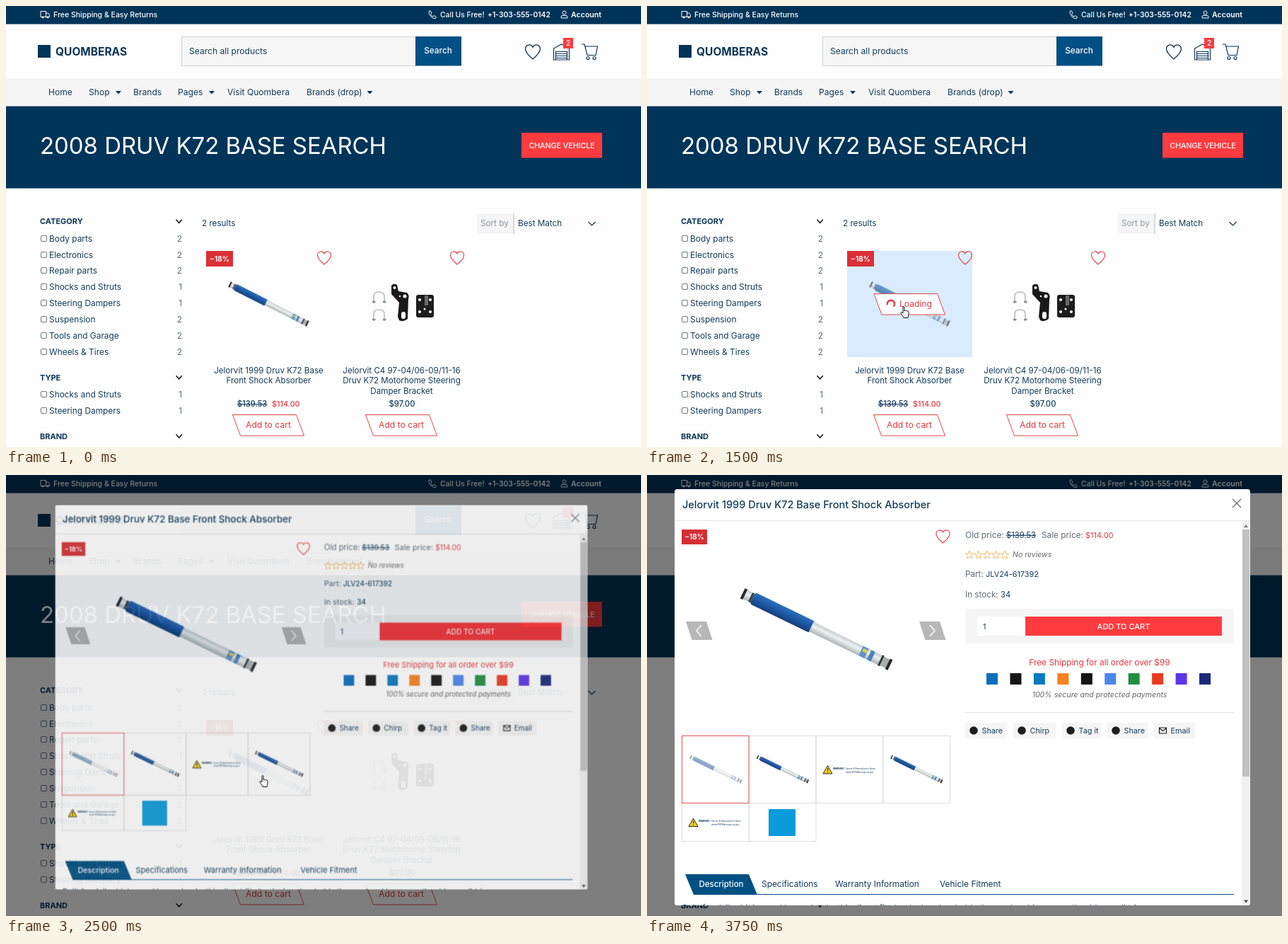
An HTML page that plays this animation: 898x623 px, repeating every 4.25 s.

```html
<!DOCTYPE html>
<html lang="en">
<head>
<meta charset="utf-8">
<title>Quick view</title>
<style>
html, body { margin: 0; width: 100%; height: 100%; overflow: hidden; background: #fefefe; }
svg { display: block; width: 898px; height: 623px; }
text { font: 12px Inter, "Open Sans", sans-serif; fill: #123c5b; white-space: pre; }
.m { font-weight: 500; }
.s { font-weight: 600; }
.b { font-weight: 700; fill: #0b3556; }
.w { fill: #fff; }
.r { fill: #e03a40; }
.g { fill: #5f6b75; }
.it { font-style: italic; fill: #666; }
.mid { text-anchor: middle; }
.end { text-anchor: end; }
.del { text-decoration: line-through; }
.line { fill: none; stroke: #0b3556; stroke-width: 1.2; }
.red { fill: #fff; stroke: #e0474c; }
.heart { fill: none; stroke: #e0474c; stroke-width: 1.2; }

.hover, .quick, .load, .spin, .photo, .dim, .modal, .hand, .arrow {
  animation: 4250ms step-end infinite;
}
.hover { animation-name: hover; }
.quick { animation-name: quick; }
.load { animation-name: load; }
.spin { animation-name: spin; }
.photo { animation-name: photo; }
.dim { animation-name: dim; }
.modal { animation-name: modal; transform-origin: 446px 314px; }
.hand { animation-name: hand; }
.arrow { animation-name: arrow; }
@keyframes hover { 0%, 52.94%, 100% { opacity: 0 } 11.76% { opacity: 1 } }
@keyframes photo { 0%, 52.94%, 100% { opacity: 1 } 11.76% { opacity: .65 } }
@keyframes quick { 0%, 29.41%, 100% { opacity: 0 } 11.76% { opacity: .4 } 17.64% { opacity: .85 } 23.52% { opacity: 1 } }
@keyframes load { 0%, 52.94%, 100% { opacity: 0 } 29.41% { opacity: 1 } }
@keyframes spin {
  0%, 29.41%, 47.05%, 100% { transform: rotate(0deg) }
  35.29% { transform: rotate(120deg) }
  41.17% { transform: rotate(240deg) }
}
@keyframes dim { 0% { opacity: 0 } 52.94% { opacity: .27 } 58.82%, 100% { opacity: .5 } }
@keyframes modal {
  0% { opacity: 0; transform: scale(.925) }
  58.82% { opacity: .87; transform: scale(.925) }
  64.7%, 100% { opacity: 1; transform: none }
}
@keyframes hand {
  0% { opacity: 0; transform: translate(364px, 439px) }
  11.76% { opacity: 1; transform: translate(364px, 439px) }
  17.64% { opacity: 1; transform: translate(361px, 430px) }
  23.52% { opacity: 1; transform: translate(358px, 424px) }
  76.47%, 100% { opacity: 0; transform: translate(358px, 424px) }
}
@keyframes arrow {
  0% { opacity: 0; transform: translate(362px, 424px) }
  76.47% { opacity: 1; transform: translate(362px, 424px) }
  82.35% { opacity: 1; transform: translate(697px, 406px) }
  88.23%, 100% { opacity: 0; transform: translate(697px, 406px) }
}
</style>
</head>
<body>
<svg id="stage" viewBox="0 0 898 623"></svg>
<script>
const text = (x, y, s, cls = '', size = 12) =>
  `<text x="${x}" y="${y}" class="${cls}" style="font-size:${size}px">${s}</text>`;
const rect = (x, y, w, h, fill, more = '') =>
  `<rect x="${x}" y="${y}" width="${w}" height="${h}" fill="${fill}" ${more}/>`;
const path = (d, more = 'class="line"') => `<path d="${d}" ${more}/>`;
const at = (x, y, body) => `<g transform="translate(${x} ${y})">${body}</g>`;
const slant = (x, y, w, h, skew, more) => path(`M${x} ${y}h${w}l${skew} ${h}h${-w}Z`, more);
const use = (id, x, y, more = '') => `<use href="#${id}" transform="translate(${x} ${y}) ${more}"/>`;
const heart = (x, y, k = 1, cls = 'heart') => `<g class="${cls}">${use('heart', x, y, `scale(${k})`)}</g>`;

const defs = `<defs>
  <linearGradient id="blue" x2="0" y2="1"><stop stop-color="#2f70b8"/><stop offset=".5" stop-color="#1c58a4"/><stop offset="1" stop-color="#153f78"/></linearGradient>
  <linearGradient id="steel" x2="0" y2="1"><stop stop-color="#c3cccd"/><stop offset=".4" stop-color="#eef1f1"/><stop offset="1" stop-color="#a9b3b4"/></linearGradient>
  <clipPath id="panel"><rect x="39" y="20" width="814" height="588" rx="3"/></clipPath>
  <path id="heart" d="M10 19C4 14 .5 10.500 .5 6.200A5 5.200 0 0 1 10 3.800A5 5.200 0 0 1 19.500 6.200C19.500 10.500 16 14 10 19Z"/>
  <g id="shock">
    ${rect(-2, -7, 17, 14, 'url(#steel)')}${rect(-2, -8, 4, 16, '#292d30')}${rect(10, -7, 4, 14, '#41474a')}
    ${rect(14, -9, 93, 18, 'url(#blue)', 'rx="3"')}
    ${rect(106, -7.5, 112, 15, 'url(#steel)')}
    ${rect(184, -7.5, 9, 15, '#5f93c5')}${rect(186, -5, 7, 5, '#d3cc62')}${rect(197, -7.5, 6, 15, '#4a83bd')}
    ${rect(214, -7, 15, 14, '#a7aeb0')}${rect(214, -8, 3, 16, '#35393b')}${rect(226, -8, 4, 16, '#232628')}
  </g>
</defs>`;

// ---- shop page ----
const caret = x => path(`M${x} 120h8l-4 4.500Z`, 'fill="#0b3556"');
const chevron = y => path(`M240.500 ${y - 2.500}l4.200 4.500 4.200-4.500`, 'fill="none" stroke="#111" stroke-width="1.500"');

function header() {
  return rect(0, 0, 898, 25.6, '#003358')
    + path('M49 7.500h7.500v8h-7.500ZM56.500 10h3l2 2.500v3h-5', 'fill="none" stroke="#fff"')
    + '<circle cx="52" cy="16" r="1.400" fill="#fff"/><circle cx="59" cy="16" r="1.400" fill="#fff"/>'
    + text(67, 16, 'Free Shipping &amp; Easy Returns', 'w m', 10.5)
    + path('M598 7.500l2-1 2 3.500-1.500 1.500q1 2.500 3.500 3.500l1.500-1.500 3 2-1 2q-3 1-6.500-2.500t-3-7.500Z', 'fill="none" stroke="#fff"')
    + text(614, 16, 'Call Us Free!', 'w m', 10.4)
    + text(681, 16, '+1-303-555-0142', 'w s', 10.3)
    + '<circle cx="789.500" cy="9.500" r="2.500" fill="none" stroke="#fff"/>'
    + path('M785 17v-1.500q0-2 2-2h5q2 0 2 2v1.500Z', 'fill="none" stroke="#fff"')
    + text(799, 16, 'Account', 'w s', 10.6)
    + rect(45, 55, 18, 18, '#003459')
    + text(70, 69.5, 'QUOMBERAS', 'b', 15.5)
    + rect(248.5, 43.5, 331, 41, '#f6f6f6', 'stroke="#cdd0d2"')
    + text(259, 68, 'Search all products', '', 12.1)
    + rect(579, 43, 65, 41.5, '#004f85') + text(611, 67.3, 'Search', 'w m mid', 11.8)
    + heart(734, 54, 1.1, 'line')
    + path('M774.500 76V60l11-6 11 6v16ZM777.500 76V64.500h16V76M777.500 67.500h16M777.500 70.500h16M777.500 73.500h16')
    + rect(788, 45, 14, 15, '#ff3b3f') + text(795, 56.3, '2', 'w m mid', 10)
    + path('M814 54h4l4 15.500h12l2.500-12.500H819')
    + '<circle cx="823" cy="73.500" r="2" class="line"/><circle cx="832" cy="73.500" r="2" class="line"/>'
    + rect(0, 102, 898, 40, '#f5f5f5')
    + [[60, 'Home'], [117, 'Shop'], [180, 'Brands'], [243, 'Pages'], [313, 'Visit Quombera'], [425, 'Brands (drop)']]
      .map(([x, s]) => text(x, 126, s, '', 12.1)).join('')
    + [155, 287, 510.5].map(caret).join('')
    + rect(0, 141.6, 898, 116, '#003459')
    + text(48, 208.5, '2008 DRUV K72 BASE SEARCH', 'w', 32.9)
    + rect(729, 179, 114, 35.5, '#ff3b3f') + text(786, 200.5, 'CHANGE VEHICLE', 'w m mid', 10.6);
}

function facet(title, y, rows) {
  return text(48, y + 4, title, 'b', 11) + chevron(y)
    + rows.map(([name, n], i) => {
      const cy = y + 24.3 + i * 22.9;
      return rect(49.5, Math.round(cy - 5) + .5, 8, 8, '#fff', 'rx="1.500" stroke="#6c7680"')
        + text(61, cy + 4, name, '', 11.9) + text(249, cy + 4, n, 'g end', 11.9);
    }).join('');
}

const cartButton = x => slant(x + .5, 577.5, 90, 29.5, 11, 'class="red"') + text(x + 51, 596, 'Add to cart', 'r mid', 12.2);

function brackets() {
  const bolt = y => path(`M520 ${y + 17}V${y + 7}q0-6 7.500-6t7.500 6v10`, 'fill="none" stroke="#b9bcbe" stroke-width="1.700"')
    + path(`M518 ${y + 15}h4.500M533 ${y + 15}h4.500`, 'stroke="#8b9093" stroke-width="2.500"');
  const hole = (x, y, r) => `<circle cx="${x}" cy="${y}" r="${r}" fill="#fff"/>`;
  return bolt(403) + bolt(428)
    + path('M545 395q3-4 8-1l2 9 12 2q4 4 2 9l-1 28q-6 5-12 2l-2-5 2-20-11-12Z', 'fill="#191919"')
    + hole(549.5, 398, 2) + hole(564, 410, 2.5) + hole(557, 410, 1.2) + rect(559, 432, 6, 10, '#fff', 'rx="3"')
    + rect(580, 408, 25, 32, '#1c1c1c', 'rx="3"') + rect(592, 409, 5, 14, '#6a6a6a')
    + hole(585, 415, 2) + hole(600, 415, 2) + hole(585, 432, 2) + hole(600, 432, 2) + hole(592, 428, 1.5);
}

function products() {
  return text(277, 311.3, '2 results', '', 11.7)
    + rect(666, 293, 51, 28, '#f5f5f5') + text(671, 311.3, 'Sort by', '', 11.7).replace('style="', 'style="fill:#8b99a5;')
    + rect(717.5, 293, 1, 29, '#aab4bb') + text(724, 311.3, 'Best Match', '', 11.7)
    + path('M823.500 305l5 5 5-5')
    + `<g class="hover">${rect(283, 346, 177, 150, '#d9ebfd')}</g>`
    + `<g class="photo">${use('shock', 317, 393.5, 'rotate(26.800) scale(.535)')}</g>`
    + rect(283, 346, 38, 22, '#dc2f36') + text(302, 360.5, '−18%', 'w b mid', 10)
    + heart(440, 346) + heart(628, 346)
    + `<g class="quick">${slant(322.5, 406.5, 86, 29.5, 11, 'class="red"')}${text(371, 425, 'Quick view', 'r mid', 11.9)}</g>`
    + `<g class="load">${slant(321, 406.5, 89.5, 29.5, 11, 'class="red"')}${text(357, 425, 'Loading', 'r', 12.1)}`
    + at(345, 421, path('M3.700 3.700A5.200 5.200 0 1 1 1.300-5', 'class="spin" fill="none" stroke="#d8343a" stroke-width="2.300"')) + '</g>'
    + brackets()
    + ['Jelorvit 1999 Druv K72 Base', 'Front Shock Absorber'].map((s, i) => text(371.5, 518.5 + i * 14.5, s, 'mid', 11.6)).join('')
    + ['Jelorvit C4 97-04/06-09/11-16', 'Druv K72 Motorhome Steering', 'Damper Bracket']
      .map((s, i) => text(559.5, 518.5 + i * 14.5, s, 'mid', 11.6)).join('')
    + text(327, 566.3, '$139.53', 'm del', 11.1) + text(376, 566.3, '$114.00', 'm r', 10.8)
    + text(560, 566.3, '$97.00', 'm mid', 11.3)
    + cartButton(320) + cartButton(508);
}

// ---- quick view panel ----
function star(x, y) {
  const pts = Array.from({ length: 10 }, (_, i) => {
    const a = i * Math.PI / 5, r = i % 2 ? 2.6 : 6;
    return (x + r * Math.sin(a)).toFixed(1) + ',' + (y - r * Math.cos(a)).toFixed(1);
  });
  return `<polygon points="${pts.join(' ')}" fill="none" stroke="#f5b967"/>`;
}

const warning = (x, y) => path(`M${x} ${y + 6}l6.500-11.500 6.500 11.500Z`, 'fill="#f7d21c" stroke="#222"')
  + rect(x + 6, y - 2, 1.2, 4, '#222') + rect(x + 6, y + 3, 1.2, 1.2, '#222')
  + text(x + 14, y - .5, '<tspan class="b">WARNING:</tspan> Cancer &amp; Reproductive Harm', '', 3.1)
  + text(x + 32, y + 4.5, 'www.P65Warnings.ca.gov', '', 3.2);

function gallery() {
  const thumb = (x, y, h, stroke = '#dedede') => rect(x, y, 94.5, h, 'none', `stroke="${stroke}"`);
  const small = x => use('shock', x, 398.5, 'rotate(25.900) scale(.345)');
  return rect(49, 77, 36, 21, '#d32f35') + text(67, 91, '−18%', 'w b mid', 9.8)
    + heart(408.5, 77)
    + use('shock', 137, 168, 'rotate(25.900)')
    + slant(55, 207, 29, 26, 8.5, 'fill="#b7b7b7"') + path('M77 212l-7 8 7 8', 'fill="none" stroke="#fff" stroke-width="1.500"')
    + slant(385, 207, 29, 26, 8.5, 'fill="#b7b7b7"') + path('M400 212l7 8-7 8', 'fill="none" stroke="#fff" stroke-width="1.500"')
    + [144, 238.5, 333.5].map(x => thumb(x + .5, 368.5, 95)).join('')
    + thumb(49.5, 463.5, 54) + thumb(144.5, 463.5, 54) + thumb(49.5, 368.5, 95, '#e0555a')
    + `<g opacity=".5">${small(62)}</g>` + small(156.5) + small(346)
    + warning(249, 416) + warning(59, 490.5)
    + rect(172, 472, 38, 38, '#0a9bdb');
}

function details() {
  const cards = ['#0a6ebd', '#151515', '#0a79be', '#f58220', '#151515', '#4d86ea', '#1f8f41', '#ea3b1e', '#5a36e8', '#1a2a7a'];
  const shares = [[450, 59, 'Share'], [518, 60, 'Chirp'], [587, 55, 'Tag it'], [651, 57, 'Share'], [717, 58, 'Email']];
  return text(450, 89, 'Old price:', 'g') + text(508, 89, '$139.53', 'del', 11.2)
    + text(558, 89, 'Sale price:', 'g', 11.8) + text(620, 89, '$114.00', 'r', 11)
    + [0, 1, 2, 3, 4].map(i => star(456 + i * 12.5, 113)).join('')
    + text(517, 116.3, 'No reviews', 'it', 10.5)
    + text(450, 144, 'Part:', 'g', 11.7) + text(479, 144, 'JLV24-617392', '', 10.9)
    + text(450, 172.5, 'In stock:', 'g', 11.7) + text(500, 172.5, '34', '', 11.2)
    + rect(450, 189, 380, 49, '#f5f5f5') + rect(467, 200, 68, 27, '#fff') + text(475, 218, '1', '', 11)
    + rect(535, 200, 278, 27, '#ff3b3f') + text(674, 217.5, 'ADD TO CART', 'w m mid', 11)
    + text(640, 268.5, 'Free Shipping for all order over $99', 'r mid', 11.9)
    + cards.map((c, i) => rect(480 + i * 33.45, 280, 16, 16, c)).join('')
    + text(640, 313.5, '100% secure and protected payments', 'it mid', 10.6)
    + rect(450, 335, 380, 1, '#dfdfdf')
    + shares.map(([x, w, s], i) => rect(x, 350, w, 22, '#f5f5f5')
      + (i < 4 ? `<circle cx="${x + 12}" cy="361" r="5.800" fill="#1d1d1d"/>`
        : path(`M${x + 7.5} 357h10v8h-10ZM${x + 7.5} 357.500l5 4 5-4`, 'fill="none" stroke="#1d1d1d" stroke-width="1.200"'))
      + text(x + 23.5, 364.5, s, '', 10.8)).join('');
}

function panel() {
  return rect(39, 20, 814, 588, '#fff', 'rx="3"')
    + text(50, 47.3, 'Jelorvit 1999 Druv K72 Base Front Shock Absorber', 'm', 14.5)
    + path('M828 34l12 12M840 34l-12 12', 'stroke="#666" stroke-width="1.200"')
    + rect(39, 64, 814, 1, '#e3e3e3')
    + rect(841, 65, 12, 543, '#f1f1f1') + rect(842, 77, 10, 349, '#c1c1c1')
    + path('M844 74l3-4 3 4Z', 'fill="#777"') + path('M844 600.500l3 4 3-4Z', 'fill="#444"')
    + gallery() + details()
    + slant(54, 564, 90, 29, 12, 'fill="#005083"') + rect(66, 592, 764, 1, '#005083')
    + text(105, 582, 'Description', 'w m mid', 11.5)
    + text(162, 582, 'Specifications', '', 11.9) + text(266, 582, 'Warranty Information', '', 11.9)
    + text(414, 582, 'Vehicle Fitment', '', 11.9)
    + text(50, 615.7, 'Built for daily driving and heavy loads, this direct fit shock absorber holds the road and improves the ride on all trips');
}

const hand = path('M4 1.500c0-1.300 2-1.300 2 0V7l.2-.2c.2-1 1.800-.9 2 .2.3-.9 1.800-.8 2 .4.4-.8 1.800-.5 1.800.8v3.500c0 2-1 2.800-1 4.800H5C4.500 14 2.500 12.500 1 10c-.8-1.400.8-2.200 1.700-1.200L4 10Z',
  'class="hand" fill="#fff" stroke="#111"');
const arrow = path('M.5.500V14l3.200-2.800 2.100 5 2.200-1-2.100-4.900h3.800Z', 'class="arrow" fill="#fff" stroke="#111" stroke-width=".9"');

document.getElementById('stage').innerHTML = defs
  + rect(0, 0, 898, 623, '#fefefe')
  + header()
  + facet('CATEGORY', 304.3, [['Body parts', 2], ['Electronics', 2], ['Repair parts', 2], ['Shocks and Struts', 1],
    ['Steering Dampers', 1], ['Suspension', 2], ['Tools and Garage', 2], ['Wheels &amp; Tires', 2]])
  + facet('TYPE', 524.8, [['Shocks and Struts', 1], ['Steering Dampers', 1]])
  + facet('BRAND', 607.8, [])
  + products()
  + rect(0, 0, 898, 623, '#000', 'class="dim"')
  + `<g class="modal"><g clip-path="url(#panel)">${panel()}</g></g>`
  + hand + arrow;
</script>
</body>
</html>
```
